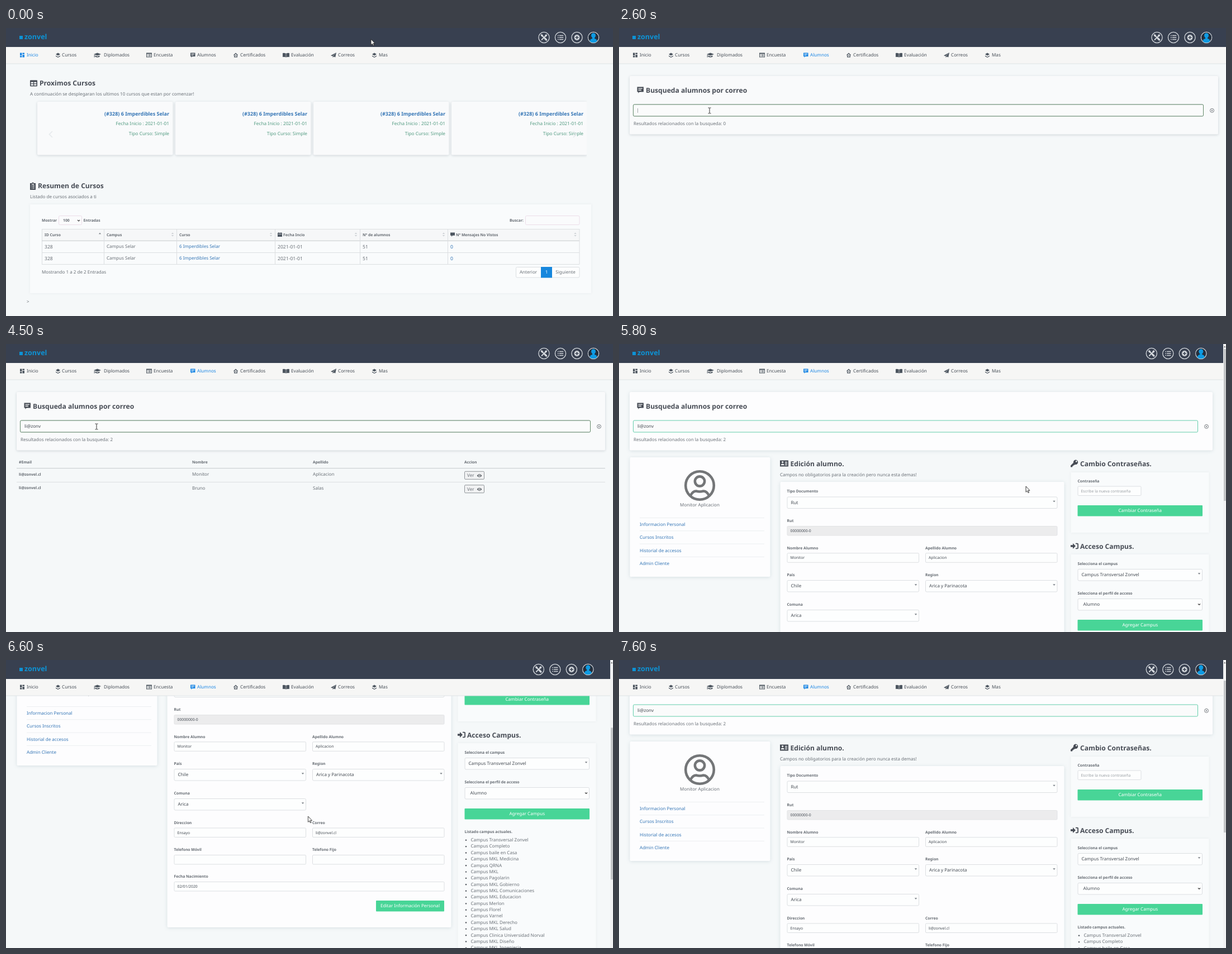
Recreate the animation shown at these times as an HTML page. Size 1086x516 px, loop 8 s.

```html
<!DOCTYPE html>
<html lang="es">
<head>
<meta charset="utf-8">
<title>Busqueda de alumnos</title>
<style>
html, body { margin: 0; width: 100%; height: 100%; overflow: hidden; background: #f5f8f9; }
svg { display: block; text-rendering: geometricPrecision; }
text { font: 8.05px "Noto Sans", "Open Sans", sans-serif; fill: #6a7077; white-space: pre; }
.n { font-size: 8.15px; fill: #474e57; }
.b { font-size: 6.8px; font-weight: 700; fill: #656b72; }
.s { font-size: 6.8px; }
.d { font-size: 8.6px; }
.g { font-size: 8.25px; fill: #519a80; }
.h { font-size: 12.1px; font-weight: 600; fill: #474c55; }
.t { font-size: 9px; font-weight: 600; }
.t, .l { fill: #3576b6; }
.on { fill: #1e88e5; }
.w { fill: #fff; }
.k { fill: #454b53; }
.ph { fill: #989da2; }
.e { text-anchor: end; }
.m { text-anchor: middle; }
.logo { font-size: 12.5px; font-weight: 700; fill: #0d93d6; }
.card { fill: #f9fafb; filter: drop-shadow(0 1px 2px rgba(40, 60, 80, .2)); }
.paper { fill: #fdfdfe; filter: drop-shadow(0 1px 3px rgba(70, 110, 130, .18)); }
.soft { fill: #f9fbfc; filter: drop-shadow(0 0 2px rgba(40, 60, 80, .07)); }
.in { fill: #fdfefe; stroke: #dcdfe2; }
.off { fill: #ececed; stroke: #e2e3e5; }
.pink { fill: #fafbfc; stroke: #ecdde9; }
.btn { fill: #f1f2f3; stroke: #8f9498; }
.go { fill: #48d597; }
.line { stroke: #dcdfe1; fill: none; }
.dark { stroke: #c6cacd; fill: none; }
</style>
</head>
<body>
<svg id="stage" width="1086" height="516" viewBox="0 0 1086 516"></svg>
<script>
const LOOP = 8000;
let css = '';

// frames: [ms, declaration, steps towards the next one]
function track(id, frames) {
  const keys = frames.map(([ms, rule, n]) =>
    `${ms * 100 / LOOP}%{${rule}${n ? `;animation-timing-function:steps(${n})` : ''}}`);
  css += `@keyframes ${id}{${keys.join('')}}#${id}{animation:${id} ${LOOP}ms step-end -20ms infinite}`;
}
function show(id, from, to = LOOP) {
  const frames = [[0, `opacity:${from ? 0 : 1}`]];
  if (from) frames.push([from, 'opacity:1']);
  if (to < LOOP) frames.push([to, 'opacity:0']);
  track(id, frames);
}
const timed = (id, from, to, body) => (show(id, from, to), `<g id="${id}">${body}</g>`);

const text = (x, y, s, c = '') => `<text x="${x}" y="${y}" dy=".35em" class="${c}">${s}</text>`;
const rect = (x, y, w, h, c, r = 0) => `<rect x="${x}" y="${y}" width="${w}" height="${h}" rx="${r}" class="${c}"/>`;
const fill = (x, y, w, h, color) => `<rect x="${x}" y="${y}" width="${w}" height="${h}" fill="${color}"/>`;
const line = (d, c = 'line') => `<path d="${d}" class="${c}"/>`;
const icon = (x, y, d, color = '#4d5660', k = 1) =>
  `<path transform="translate(${x} ${y}) scale(${k})" d="${d}" fill="${color}" fill-rule="evenodd"/>`;
const group = (x, y, body) => `<g transform="translate(${x} ${y})">${body}</g>`;
const chevron = (x, y) => `<path d="M${x - 2} ${y - 1}l2 2 2-2" fill="none" stroke="#444" stroke-width="1.2"/>`;
const caretDown = (x, y) => icon(x, y, 'M-2.2-1.2h4.4L0 1.4z', '#7c8288');

const ICON = {
  dash: 'M0-4h3.5v4.5H0zM0 1.3h3.5V4H0zM4.5-4H8v2.6H4.5zM4.5-.5H8V4H4.5z',
  layers: 'M0-1.5L4-4 8-1.5 4 1zM0 .8l4 2.5 4-2.5v1.4L4 4.6 0 2.2z',
  cap: 'M0-1.5L6.5-4 13-1.5 6.5 1zM2.5.8V3q4 2 8 0V.8l-4 1.6zM.8-.6h.9V4H.6z',
  list: 'M0-4h10V4H0zM1-2v5h8v-5zM2-1h1v1H2zM4-1h4v1H4zM2 1h1v1H2zM4 1h4v1H4z',
  note: 'M0-4h8.5v6.5H3l-1.5 2v-2H0zM1.5-2.5v1H7v-1zM1.5-.3v1h4v-1z',
  home: 'M4-4L8.3 0H7v4H1V0H-.3zM4-2.3L2.2-.6v3.4h3.6V-.6zM3.2 0h1.6v1.5H3.2z',
  book: 'M0-3.5q3-.8 5.7.5v7Q3 2.8 0 3.4zM6.3-3q2.7-1.3 5.7-.5v6.9q-3-.6-5.7.6z',
  send: 'M10-4.5L0 .8 3 2zM10-4.5L3.6 2.3v2.3l1.7-1.8L8.2 4z',
  table: 'M1-5.5h11q1 0 1 1v9q0 1-1 1H1q-1 0-1-1v-9q0-1 1-1zM1.6-2.2v2.4h4.2v-2.4zM7.2-2.2v2.4h4.2v-2.4zM1.6 1.6V4h4.2V1.6zM7.2 1.6V4h4.2V1.6z',
  clip: 'M0-5h3q2-3 4 0h3V7H0zM2-1.8v1h1v-1zM4-1.8v1h4v-1zM2 .8v1h1v-1zM4 .8v1h4v-1zM2 3.4v1h1v-1zM4 3.4v1h4v-1zM3-4v1.2h4V-4z',
  ident: 'M0-5.5h15v11H0zM3-2.4a1.7 1.7 0 1 0 3.4 0 1.7 1.7 0 1 0-3.4 0zM1.8 3.2h5.8q0-2.6-2.9-2.6T1.8 3.2zM9-3v1.2h4.2V-3zM9-.5v1.2h4.2V-.5zM9 2v1.2h4.2V2z',
  key: 'M9-6.5a4.3 4.3 0 1 1-1.4 8.4L6.3 3.2H4.8v1.6H3.2v1.7H0V3.8l5-5A4.3 4.3 0 0 1 9-6.5zM9-3.6a1.3 1.3 0 1 0 2.6 0 1.3 1.3 0 1 0-2.6 0z',
  enter: 'M0-1.7h4V-5l5 5-5 5V1.7H0zM9-5.2h3q2 0 2 2v6.4q0 2-2 2H9V3.5h2.6q.6 0 .6-.6v-5.8q0-.6-.6-.6H9z',
  date: 'M0-3h1.5v-1h1v1h3v-1h1v1H8V4H0zM.8-1.2v.7h6.4v-.7z',
  chat: 'M0-3.5h8v5.2H4L2 4V1.7H0z',
  eye: 'M-4.4 0Q0-5.6 4.4 0 0 5.6-4.4 0zM-2 0a2 2 0 1 0 4 0 2 2 0 1 0-4 0zM-1 0a1 1 0 1 0 2 0 1 1 0 1 0-2 0z'
};

const NAV = [
  ['Inicio', 'dash', 25, 37], ['Cursos', 'layers', 89, 100], ['Diplomados', 'cap', 157, 175],
  ['Encuesta', 'list', 251, 264], ['Alumnos', 'note', 330, 342], ['Certificados', 'home', 407, 419],
  ['Evaluación', 'book', 495, 510], ['Correos', 'send', 581, 594], ['Mas', 'layers', 655, 667]
];
const navItem = ([name, ic, ix, tx], on) =>
  icon(ix, 48.5, ICON[ic], on ? '#1e88e5' : '#4d5660') + text(tx, 48.3, name, on ? 'n on' : 'n');

function header(active, shift = 0) {
  const pale = '#d3d7dc';
  const ring = (x, body) => group(x - shift, 17,
    `<circle r="9.6" fill="none" stroke="${pale}" stroke-width="1.3"/>${body}`);
  const tools = `<path d="M-4-4L4 4M4-4L-4 4" stroke="${pale}" stroke-width="1.8" stroke-linecap="round"/>` +
    `<path d="M1.500 1.500L4.200 4.200M-4.200-4.200L-3-3M3-3L4-4" stroke="${pale}" stroke-width="3.2" stroke-linecap="round"/>`;
  const rows = [-3.5, 0, 3.5].map(y => fill(-5, y - .7, 1.6, 1.4, pale) + fill(-2.2, y - .7, 7.4, 1.4, pale)).join('');
  const plus = `<circle r="4.9" fill="${pale}"/><path d="M-3 0H3M0-3V3" stroke="#384050" stroke-width="1.5"/>`;
  const user = '<circle r="9" fill="#252f3d"/><path d="M-6.6 6.4Q-6 2.6-2 2V.5a4 4.6 0 1 1 4 0V2Q6 2.6 6.6 6.4A9 9 0 0 1-6.6 6.4z" fill="#0e9ae2"/>';
  return fill(0, 34, 1086, 30, '#f6f6f5') + fill(0, 63.5, 1086, 1, '#dfe3e6') + fill(0, 0, 1086, 34, '#384050') +
    fill(24, 14, 6, 6, '#0d93d6') + text(33, 16, 'zonvel', 'logo') +
    ring(962.5, tools) + ring(992, rows) + ring(1021.5, plus) + ring(1051, user) +
    NAV.map(item => navItem(item, item[0] === active)).join('');
}

// ---- start page
const COURSE = '6 Imperdibles Selar';

function homePage() {
  let out = icon(43, 99, ICON.table, '#474c55') + text(60, 99, 'Proximos Cursos', 'h') +
    text(43, 118, 'A continuación se desplegaran los ultimos 10 cursos que estan por comenzar!');
  for (let x = 56; x < 800; x += 247) {
    out += rect(x, 132, 242.5, 95.5, 'card', 2) + text(x + 236, 154, `(#328) ${COURSE}`, 't e') +
      text(x + 236, 171, 'Fecha Inicio : 2021-01-01', 'g e') + text(x + 236, 189, 'Tipo Curso: Simple', 'g e');
  }
  out += fill(1039, 128, 8, 106, '#f5f8f9') +
    '<path d="M83 185l-5.500 5.500 5.500 5.500M1015 185l5.500 5.500-5.500 5.500" fill="none" stroke="#e6eaec" stroke-width="1.5"/>';

  out += icon(43, 283, ICON.clip, '#474c55') + text(57, 283, 'Resumen de Cursos', 'h') +
    text(43, 302.5, 'Listado de cursos asociados a ti') + rect(43, 316, 1004, 159, 'soft') +
    text(64, 344.5, 'Mostrar', 'b') + rect(94.5, 336.5, 41, 16, 'pink', 2) + text(102, 345, '100', 'b') +
    chevron(130, 345) + text(138.5, 344.5, 'Entradas', 'b') +
    text(926, 344.5, 'Buscar:', 'b e') + rect(929.5, 336.5, 96.5, 16, 'pink', 2);

  const cols = [64.5, 175.5, 305.5, 481.5, 633.5, 790.5, 1026];
  const heads = ['ID Curso', 'Campus', 'Curso', 'Fecha Incio', 'Nº de alumnos', 'Nº Mensajes No Vistos'];
  const cells = ['328', 'Campus Selar', COURSE, '2021-01-01', '51', '0'];
  const kinds = ['d', '', 'l', 'd', 'd', 'l d'];
  out += fill(64.5, 360, 961.5, 21, '#f6f7f8') + line('M64.5 360V423.5M64 360.5H1026M64 402.5H1026M64 423.5H1026') +
    line('M64 381.2H1026', 'dark') + icon(486, 370, ICON.date) + icon(795, 370, ICON.chat);
  heads.forEach((name, i) => {
    const x = cols[i] + 4.5, end = cols[i + 1];
    out += line(`M${end} 360V423.5`) + text(x + (i === 3 || i === 5 ? 10 : 0), 370.3, name, 'b') +
      icon(end - 7.5, 370, i ? 'M-2.2-1L0-3.4 2.2-1zM-2.2 1L0 3.4 2.2 1z' : 'M-2.2-.8L0-3.2 2.2-.8z', i ? '#ccd0d4' : '#80868c') +
      text(x, 391.5, cells[i], kinds[i]) + text(x, 412.5, cells[i], kinds[i]);
  });
  return out + text(64, 437, 'Mostrando 1 a 2 de 2 Entradas') + rect(912.5, 428.5, 113.5, 18.5, 'in', 2) +
    fill(957, 428, 20, 19.5, '#1787dd') + text(934.5, 437.5, 'Anterior', 'm') +
    text(967, 437.5, '1', 'w m') + text(1001, 437.5, 'Siguiente', 'm') + text(37, 490, '&gt;');
}

const dropdown = () => timed('menu', 500, 2000,
  fill(326, 40, 54, 18, '#f6f6f5') + navItem(NAV[4], true) +
  rect(315.5, 64.5, 146.5, 78.5, 'card') +
  text(330, 82.5, 'Busqueda Alumno Por Rut', 'n') + text(330, 103, 'Busqueda Alumno Por Correo', 'n') +
  text(330, 123.5, 'Busqueda Alumno Por Nombre', 'n') +
  timed('hot1', 900, 1100, fill(328, 75, 120, 15, '#f9fafb') + text(330, 82.5, 'Busqueda Alumno Por Rut', 'n on')) +
  timed('hot2', 1100, 2000, fill(328, 96, 120, 15, '#f9fafb') + text(330, 103, 'Busqueda Alumno Por Correo', 'n on')));

// ---- search page
function searchCard(right, stroke, kind = 'card') {
  return rect(19, 86, right - 19, 104.5, kind, 2) + icon(32.5, 111, ICON.note, '#474c55', 1.35) +
    text(48, 111.5, 'Busqueda alumnos por correo', 'h') +
    `<rect x="25.5" y="137" width="${right - 52}" height="21" rx="2" fill="#fafbfb" stroke="${stroke}"/>` +
    `<g transform="translate(${right - 11} 147.8)" fill="none" stroke="#6c7278" stroke-width=".9"><circle r="3.5"/><path d="M-1.4-1.4l2.8 2.8M1.4-1.4l-2.8 2.8"/></g>`;
}
const results = n => text(26, 171.5, `Resultados relacionados con la busqueda: ${n}`);

const PEOPLE = [
  ['li@zonvel.cl', 'Monitor', 'Aplicacion'],
  ['li@zonvel.cl', 'Bruno', 'Salas'],
  ['ramonafarelli@buzon.test', 'Ramona Isidora', 'Farelli Del Rio'],
  ['Irene.robledo.nali@buzon.test', 'Irene Natalia', 'Robledo Campos'],
  ['carlelli@correo.test', 'Greta', 'Olmedo'],
  ['spintobarcelli@buzon.test', 'Silvia', 'Pinto Barcelli'],
  ['josefinacortaneli@buzon.test', 'Josefina', 'Corta'],
  ['dsotelomarantelli@buzon.test', 'Dario Ignacio', 'Sotelo Marantelli'],
  ['pscordanelli@correo.test', 'Beatriz', 'Sotelo Cordanelli'],
  ['ineszamborelli@buzon.test', 'Ines Margarita', 'Zamborelli Fuentes']
];
function people(rows, xs) {
  let out = ['#Email', 'Nombre', 'Apellido', 'Accion'].map((h, i) => text(xs[i], 212, h, 'b')).join('') +
    line('M19 222.7H1072', 'dark');
  rows.forEach(([mail, name, last], i) => {
    const y = 233.3 + i * 24.45, x = xs[3];
    out += text(xs[0], y, mail, 'b') + text(xs[1], y, name) + text(xs[2], y, last) +
      rect(x + .5, y - 5, 35, 14, 'btn', 1.5) + text(x + 5, y + 2, 'Ver') + icon(x + 27, y + 2.6, ICON.eye, '#555b61');
    if (i < rows.length - 1) out += line(`M19 ${y + 14.2}H1072`);
  });
  return out;
}

const QUERY = 'li@zonv', KEYS = [2800, 2900, 3000, 3600, 3800, 3900, 4000];
function searchPage() {
  const typed = [...QUERY].map((_, i) =>
    timed('key' + i, KEYS[i], KEYS[i + 1], text(33, 147, QUERY.slice(0, i + 1), 'k'))).join('');
  const bar = '<tspan dx="-1.6">|</tspan>';
  const carets = [2600, ...KEYS].map((t, i, all) =>
    timed('bar' + i, t, all[i + 1] || 4500, text(33, 147, `<tspan fill="none">${QUERY.slice(0, i)}</tspan>${bar}`))).join('');
  return searchCard(1072, '#d3d8db') +
    timed('focus', 2600, LOOP, '<rect x="25.5" y="137" width="1020" height="21" rx="2" fill="none" stroke="#63896a"/>') +
    typed + carets +
    timed('zero', 2000, 3500, results(0)) +
    timed('many', 3500, 4100, results(10) + people(PEOPLE, [23, 410, 665, 924])) +
    timed('few', 4100, LOOP, results(2) + people(PEOPLE.slice(0, 2), [23, 333, 549, 820]));
}

// ---- edit page, laid out at a scroll of 57
const label = (x, y, s) => text(x, y, s, 'b');
const input = (x, y, w, name, value, c = 'in', tc = 's k') =>
  label(x, y - 9, name) + rect(x + .5, y + .5, w - 1, 16.5, c, 1.5) + text(x + 6, y + 8.8, value, tc);
const select = (x, y, w, name, value, native) =>
  label(x, y - 9.5, name) + rect(x + .5, y + .5, w - 1, 20.5, 'in', 2) +
  text(x + (native ? 10 : 7), y + 10.3, value, 'k') +
  (native ? chevron(x + w - 6, y + 10.5) : caretDown(x + w - 6, y + 8.5));
const button = (x, y, w, s) => rect(x, y, w, 19.5, 'go', 1) + text(x + w / 2, y + 9.3, s, 'w m');

const CAMPUS = ['Transversal Zonvel', 'Completo', 'baile en Casa', 'MKL Medicina', 'QRNA', 'MKL', 'Pagolarin',
  'MKL Gobierno', 'MKL Comunicaciones', 'MKL Educacion', 'Merlon', 'Florel', 'Varnel', 'MKL Derecho', 'MKL Salud',
  'Clinica Universidad Norval', 'MKL Diseño', 'MKL Ingenieria'];

function editPage() {
  let out = group(0, -57, searchCard(1062, '#62cdaa', 'paper') + text(33, 147, QUERY, 'k') + results(2));

  out += rect(19.5, 146, 251, 214, 'paper', 2) +
    '<g fill="none" stroke="#747678" stroke-width="4.6"><circle cx="144.5" cy="196.5" r="25.3"/><circle cx="144.5" cy="189" r="8.6"/><path d="M128 214.5q4-8 10-8 6.5 2 13 0 6 0 10 8"/></g>' +
    text(144.5, 231, 'Monitor Aplicacion', 'm');
  ['Informacion Personal', 'Cursos Inscritos', 'Historial de accesos', 'Admin Cliente'].forEach((s, i) => {
    out += text(37, 266.3 + i * 23.3, s, 'l') + `<path d="M37 ${254.5 + i * 23.3}H260" stroke="#eceff1"/>`;
  });

  out += icon(288, 157, ICON.ident, '#474c55') + text(306.5, 157.5, 'Edición alumno.', 'h') +
    text(288, 177, 'Campos no obligatorios para la creación pero nunca esta demas!') +
    rect(288.5, 190, 508, 460, 'paper', 2) +
    select(300.5, 216.5, 484, 'Tipo Documento', 'Rut') +
    input(300.5, 269, 484, 'Rut', '00000000-0', 'off') +
    input(300.5, 317.3, 236.5, 'Nombre Alumno', 'Monitor') + input(548, 317.3, 236.5, 'Apellido Alumno', 'Aplicacion') +
    select(300.5, 366, 236.5, 'País', 'Chile') + select(548, 366, 236.5, 'Region', 'Arica y Parinacota') +
    select(300.5, 419, 236.5, 'Comuna', 'Arica') +
    input(300.5, 471.5, 236.5, 'Direccion', 'Ensayo') + input(548, 471.5, 236.5, 'Correo', 'li@zonvel.cl') +
    input(300.5, 520, 236.5, 'Telefono Móvil', '') + input(548, 520, 236.5, 'Telefono Fijo', '') +
    input(300.5, 568, 484, 'Fecha Nacimiento', '02/01/2020') +
    button(662, 602, 122, 'Editar Información Personal');

  out += icon(808, 157, ICON.key, '#474c55') + text(825, 157.5, 'Cambio Contraseñas.', 'h') +
    rect(808.5, 173, 247, 108, 'soft') +
    input(820.5, 197.5, 114, 'Contraseña', 'Escribe la nueva contraseña', 'in', 's ph') +
    button(820.5, 232, 223.5, 'Cambiar Contraseña') +
    icon(808, 305, ICON.enter, '#474c55') + text(825, 305.5, 'Acceso Campus.', 'h') +
    rect(808.5, 320, 247, 420, 'soft') +
    select(820.5, 346, 223.5, 'Selecciona el campus', 'Campus Transversal Zonvel') +
    select(820.5, 399, 223.5, 'Selecciona el perfil de acceso', 'Alumno', true) +
    button(820.5, 437, 223.5, 'Agregar Campus') + label(820.5, 479, 'Listado campus actuales.');
  CAMPUS.forEach((s, i) => {
    const y = 493.3 + i * 11.36;
    out += `<circle cx="823" cy="${y + .5}" r="1.2" fill="#4d535a"/>` + text(831.5, y, 'Campus ' + s);
  });
  return `<g id="scroll">${out}</g>` + header('Alumnos', 9.7) +
    fill(1081, 0, 5, 516, '#f1f2f3') + icon(1083.7, 5, 'M-1.6 1L0-1.2 1.6 1z', '#555') +
    `<g id="thumb">${fill(1082, 9, 4, 272, '#c3c5c7')}</g>`;
}

// wheel down, then back up
const SCROLL = [[0, 0], [6000, 30], [6100, 97], [6200, 150], [6300, 176], [6400, 205], [6500, 221], [6600, 228],
  [6800, 222], [6900, 202], [7000, 172], [7100, 142], [7200, 112], [7300, 86], [7400, 68], [7500, 59], [7600, 57]];
track('scroll', SCROLL.map(([t, y]) => [t, `transform:translateY(${57 - y}px)`]));
track('thumb', SCROLL.map(([t, y]) => [t, `transform:translateY(${y / 2.03}px)`]));

// ms, x, y, steps to the next point
const PATH = [[0, 653, 20, 4], [400, 400, 44, 3], [700, 352, 71], [800, 352, 71, 6], [1400, 348, 108], [1600, 348, 108, 2],
  [1800, 249, 140, 7], [2500, 162, 148], [4500, 162, 148, 2], [4700, 280, 138, 2], [4900, 480, 140, 4], [5300, 842, 241],
  [5500, 842, 241, 8], [6300, 538, 278, 6], [6900, 543, 282], [7100, 543, 282, 5], [7600, 560, 530]];
track('pointer', PATH.map(([t, x, y, n]) => [t, `transform:translate(${x}px,${y}px)`, n]));

const arrow = '<path d="M0 0V10.4L2.4 8.2 4 11.8 5.6 11.1 4 7.6H7Z" fill="#fff" stroke="#222" stroke-width=".9"/>';
const beam = '<path d="M-2.5-5H-.6L0-4.4.6-5H2.5M0-4.4V4.4M-2.5 5H-.6L0 4.4.6 5H2.5" fill="none" stroke="#333"/>';

document.getElementById('stage').innerHTML =
  timed('home', 0, 2000, homePage() + header('Inicio') + dropdown()) +
  timed('search', 2000, 5600, searchPage() + header('Alumnos')) +
  timed('edit', 5600, LOOP, editPage()) +
  `<g id="pointer">${timed('arrow1', 0, 2000, arrow)}${timed('beam', 2000, 4900, beam)}${timed('arrow2', 4900, LOOP, arrow)}</g>`;
document.head.appendChild(document.createElement('style')).textContent = css;
</script>
</body>
</html>
```
